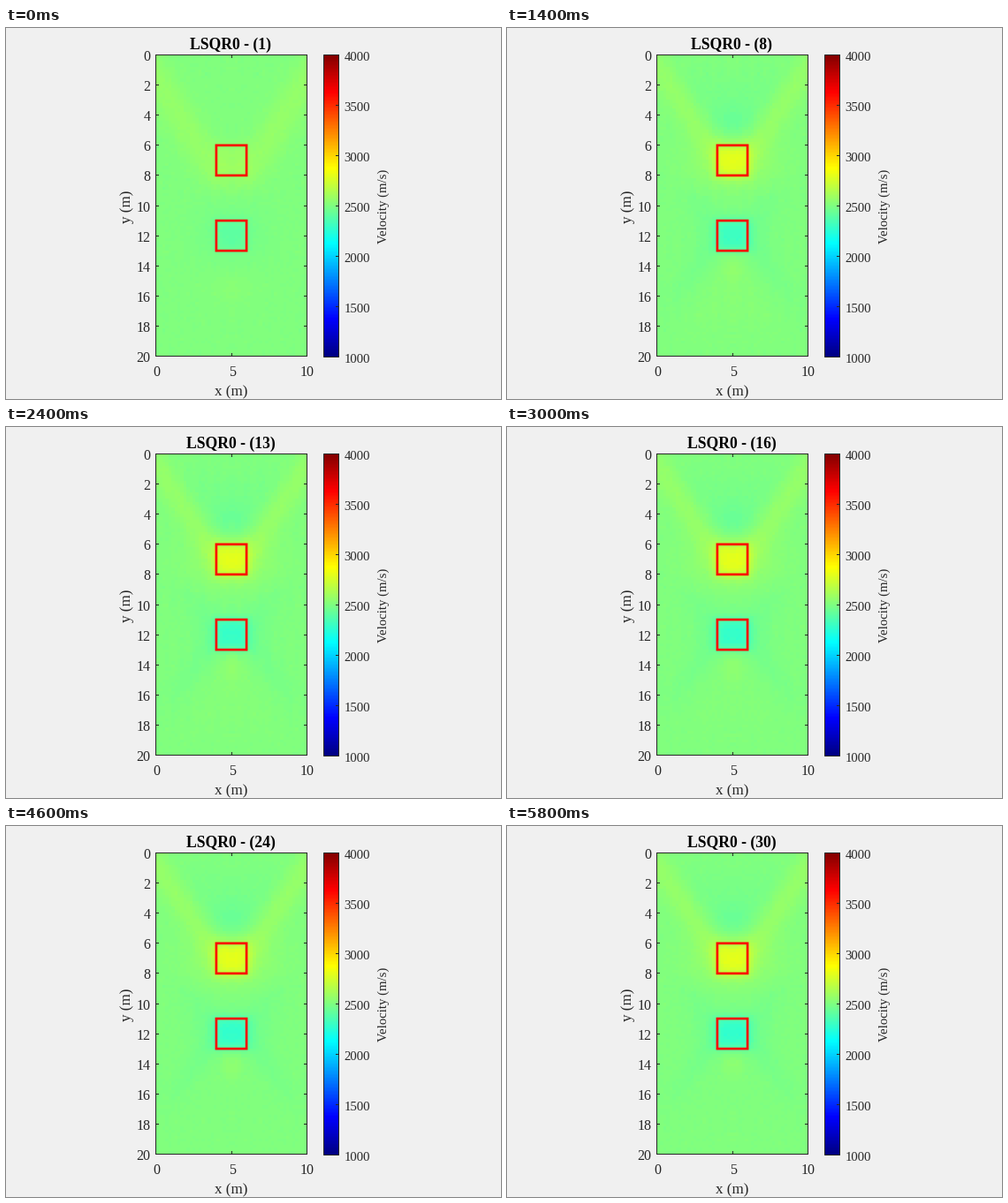
Write a matplotlib script that moves like this. It is 560 by 420 pixels and loops after 6000 ms.

```python
import numpy as np
import matplotlib.pyplot as plt
from matplotlib.animation import FuncAnimation
from matplotlib.colors import ListedColormap
from matplotlib.patches import Rectangle

W, H, DPI = 560, 420, 100
FRAMES, STEP = 30, 200
LEFT, RIGHT, TOP, BOTTOM = 169.5, 340.5, 30.5, 371.5
BAR_L, BAR_R, BAR_B = 359.5, 376.5, 372.5
VMIN, VMAX = 1000, 4000
INK = (0.15, 0.15, 0.15)
PX = 72 / DPI

plt.rcParams["font.family"] = "Liberation Serif"

levels = (np.arange(256) + 0.5) / 256
jet = ListedColormap(np.column_stack(
    [np.clip(1.5 - np.abs(4 * levels - c), 0, 1) for c in (3, 2, 1)]))

gx, gy = np.meshgrid((np.arange(50) + 0.5) / 5, (np.arange(100) + 0.5) / 5)
off = np.abs(gx - 5)
rng = np.random.default_rng(4)
half = rng.normal(size=(100, 25))
grain = np.hstack([half, half[:, ::-1]])


def bump(cy, sx, sy, p=2):
    return np.exp(-0.5 * ((off / sx) ** p + (np.abs(gy - cy) / sy) ** p))


def band(center, width):
    return np.exp(-0.5 * ((off - center) / width) ** 2)


def ramp(a, soft=0.5):
    return 1 / (1 + np.exp(-(gy - a) / soft))


arms = band(5.5 - 0.65 * gy, 0.75) * (1 - ramp(7, 0.4))
wide_arms = band(6 - 0.62 * gy, 0.95) * (1 - ramp(9, 0.4))
wedge = ramp(1.5) / (1 + np.exp((off - 4.4 + 0.65 * gy) / 0.3)) * (1 - ramp(5.5, 0.3))
wings = band(0.65 * (gy - 12) + 1, 0.6) * ramp(12.3, 0.3) * (1 - ramp(16, 0.6))
top_wings = band(0.6 * (12 - gy) + 1, 0.8) * ramp(9, 0.4) * (1 - ramp(12))
tail = ramp(14) * (1 - ramp(18, 0.7)) / (1 + np.exp((off - 0.55 * (gy - 12.5)) / 0.3))

start = (55 * bump(7, 1.1, 1, 4) + 60 * wide_arms
         - 60 * bump(12, 1.05, 0.95, 4) - 42 * bump(11.8, 1.6, 1.3)
         + 25 * bump(15.5, 1, 0.8))
high = (155 * bump(7.1, 1.05, 0.95, 4) + 65 * bump(7.1, 1.2, 1.1)
        + 60 * bump(7.1, 2, 1.1) + 60 * arms)
low = 160 * bump(12, 1.05, 0.95, 4) + 65 * bump(12, 1.5, 1)
shade = (-48 * bump(4.5, 0.9, 0.8) - 28 * wedge - 28 * wings - 25 * top_wings
         + 45 * bump(14, 0.6, 0.7))


def velocity(n):
    early = np.exp(-(n - 1) / 1.8)
    slow = 1 - np.exp(-(n - 1) / 7)
    fade = np.exp(-((n - 9) / 9) ** 2)
    ripple = np.sin(2.1 * np.pi * off + 0.35 * n) * np.sin(0.8 * gy + 0.5 * n)
    noise = 4 * grain + 6 * ripple * (0.4 + 0.6 * fade)
    return (2503 + early * start + (1 - early) * (high + shade)
            - (0.55 * (1 - early) + 0.45 * slow) * low
            + 20 * fade * (1 - early) * tail + noise)


fig = plt.figure(figsize=(W / DPI, H / DPI), dpi=DPI, facecolor="#f0f0f0")
ax = fig.add_axes([0, 0, 1, 1])


def label(x, y, s, size, ha="center", color=INK, **kw):
    return ax.text(x, y, s, fontsize=size * PX, ha=ha, va="baseline",
                   color=color, rotation_mode="anchor", **kw)


def line(xs, ys):
    ax.plot(xs, ys, color=INK, lw=PX, solid_capstyle="butt", snap=False, zorder=4)


def frame(x0, y0, x1, y1, color=INK, width=1, z=4):
    ax.add_patch(Rectangle((x0, y0), x1 - x0, y1 - y0, fill=False, ec=color,
                           lw=width * PX, joinstyle="miter", snap=False, zorder=z))


def pixel(v):
    return np.floor(v) + 0.5


image = ax.imshow(velocity(1), cmap=jet, vmin=VMIN, vmax=VMAX, aspect="auto",
                  interpolation="nearest", extent=(LEFT, RIGHT, BOTTOM, TOP))
ax.imshow(np.linspace(1, 0, 256)[:, None], cmap=jet, vmin=0, vmax=1, aspect="auto",
          interpolation="nearest", extent=(BAR_L, BAR_R, BAR_B, TOP))
ax.set(xlim=(0, W), ylim=(H, 0))
ax.axis("off")

ux, uy = (RIGHT - LEFT) / 10, (BOTTOM - TOP) / 20
frame(LEFT, TOP, RIGHT, BOTTOM)
frame(BAR_L, TOP, BAR_R, BAR_B)
for depth in (6, 11):
    frame(LEFT + 4 * ux, TOP + depth * uy, LEFT + 6 * ux,
          TOP + (depth + 2) * uy, "red", 2.67, 5)

for v in range(0, 21, 2):
    y = pixel(TOP + v * uy)
    line([LEFT, LEFT + 3.5], [y, y])
    line([RIGHT - 3.5, RIGHT], [y, y])
    label(163.7, y + 6.8, str(v), 16, "right")
for v in (0, 5, 10):
    x = pixel(LEFT + v * ux)
    line([x, x], [TOP, TOP + 3.5])
    line([x, x], [BOTTOM - 3.5, BOTTOM])
    label(x + 0.5, 393.5, str(v), 16)
for v in range(VMIN, VMAX + 1, 500):
    y = pixel(BAR_B - (v - VMIN) / (VMAX - VMIN) * (BAR_B - TOP))
    line([BAR_R - 3.5, BAR_R], [y, y])
    label(382.6, y + 6.8, str(v), 14.8, "left")

label(255, 416.6, "x (m)", 17)
label(141, 202, "y (m)", 17, rotation=90)
label(431, 202, "Velocity (m/s)", 14.8, rotation=90)
title = label(254, 24, "", 17.6, color="black", weight="bold")


def update(i):
    image.set_data(velocity(i + 1))
    title.set_text(f"LSQR0 - ({i + 1})")
    return image, title


anim = FuncAnimation(fig, update, frames=FRAMES, interval=STEP,
                     repeat=True, repeat_delay=0)
plt.show()
```
